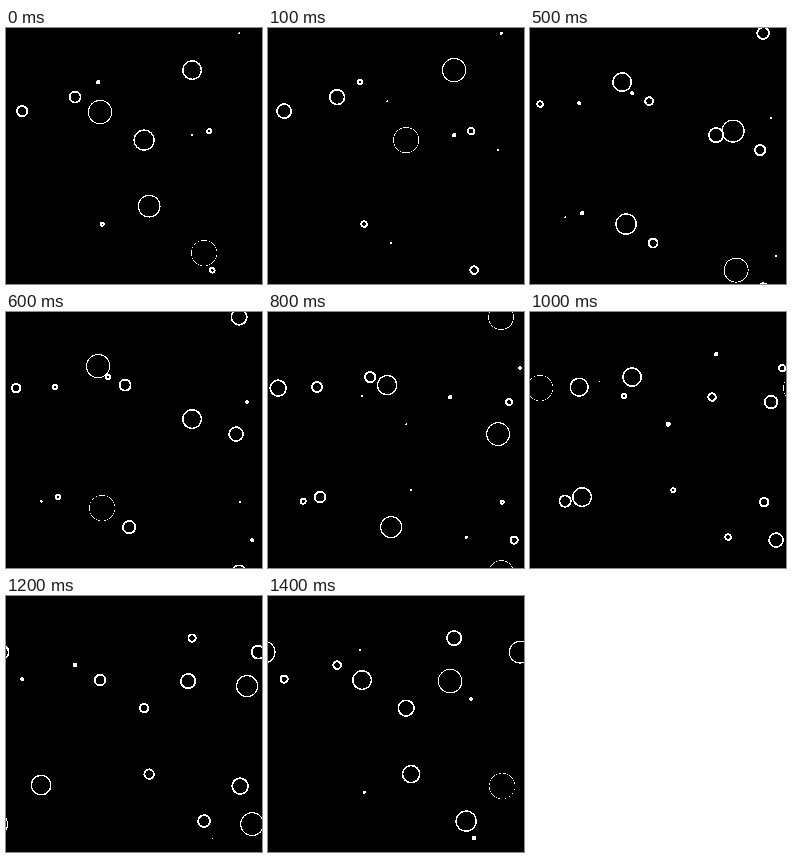
Recreate the animation shown at these times as an HTML page with a canvas. Size 256x256 px, loop 1.5 s.

```html
<!DOCTYPE html>
<html>
<head>
<meta charset="utf-8">
<title>Ripples</title>
<style>
  html, body { margin: 0; height: 100%; overflow: hidden; background: #000; }
  canvas { display: block; width: 100vw; height: 100vh; image-rendering: pixelated; }
</style>
</head>
<body>
<canvas id="stage" width="256" height="256"></canvas>
<script>
const SIZE = 256, LOOP = 1500, STEP = 100;
const GROWTH = 1080, VISIBLE = 829, MAX_RADIUS = 13.1, WEIGHT = 2;
const CENTER = 0.4; // ring centres sit just up and left of the pixel centre
const ECHO = { x: 27, y: 19, delay: 284 };

const rings = [];

// Rings that vanish one after another, `gap` ms apart
function burst(start, gap, points) {
  points.forEach(([x, y], i) => rings.push({ x, y, end: start + i * gap }));
}

// A burst that repeats once, shifted in place and time
function echoedBurst(start, gap, points) {
  burst(start, gap, points);
  burst(start + ECHO.delay, gap, points.map(([x, y]) => [x + ECHO.x, y + ECHO.y]));
}

burst(328, 17, [[69, 69], [16, 83]]);
echoedBurst(527, 38, [[206, 242], [203, 103], [96, 196], [92, 54]]);
burst(738, 265, [[186, 107], [10, 76]]);
burst(1138, 10, [[52, 185], [102, 65], [49, 75]]);
burst(1250, 34, [[246, 228], [241, 90], [35, 189]]);
burst(1402, 34, [[234, 190], [182, 85], [252, 56], [198, 225], [94, 84], [143, 178], [138, 112], [186, 42]]);

const ctx = document.getElementById("stage").getContext("2d");
const wrap = v => (v + SIZE) % SIZE;

// Hard-edged ring on a wrapping stage, thinning as it grows
function drawRing(x, y, outer) {
  const inner = outer - WEIGHT * Math.cbrt(1 - (outer / MAX_RADIUS) ** 2);
  const reach = Math.ceil(outer) + 1;
  for (let dy = -reach; dy <= reach; dy++) {
    for (let dx = -reach; dx <= reach; dx++) {
      const d = Math.hypot(dx + CENTER, dy + CENTER);
      if (d <= outer && d > inner) ctx.fillRect(wrap(x + dx), wrap(y + dy), 1, 1);
    }
  }
}

function draw(time) {
  ctx.fillStyle = "#000";
  ctx.fillRect(0, 0, SIZE, SIZE);
  ctx.fillStyle = "#fff";
  for (const { x, y, end } of rings) {
    const left = (end - time + LOOP) % LOOP;
    if (left < VISIBLE) drawRing(x, y, MAX_RADIUS * (1 - left / GROWTH) ** 2);
  }
}

const start = performance.now();
function tick() {
  const time = (performance.now() - start) % LOOP;
  draw(Math.floor(time / STEP) * STEP);
  requestAnimationFrame(tick);
}
tick();
</script>
</body>
</html>
```
